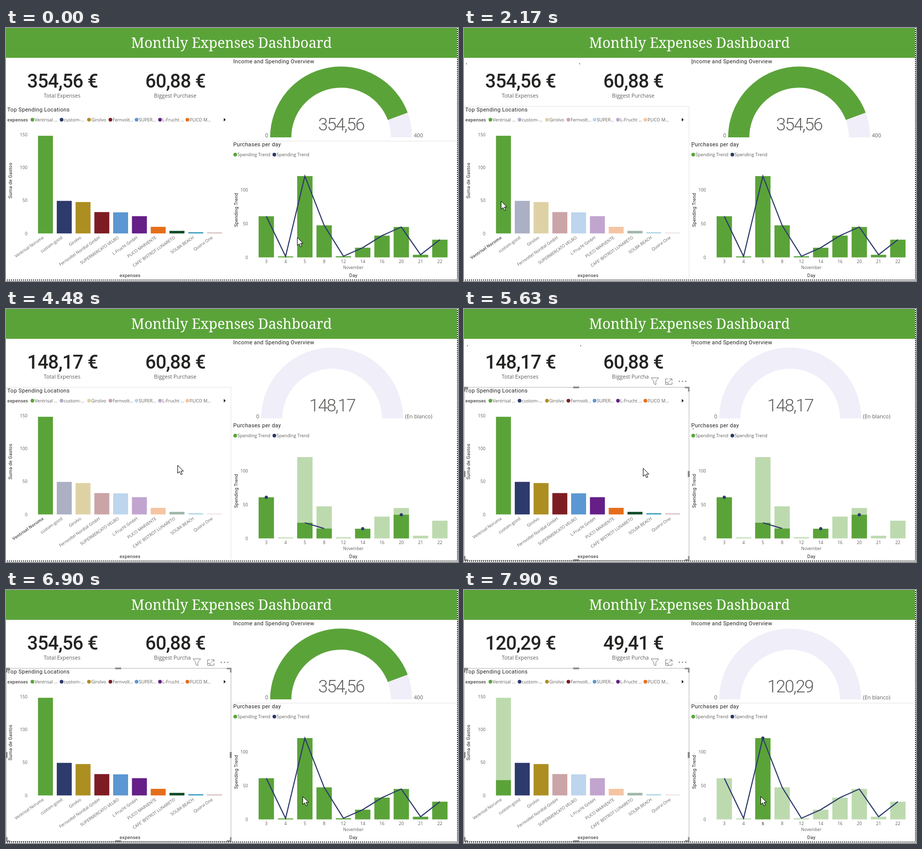
Animation, 907 px wide and 509 px high, one loop 8 s. Source, as an HTML page:

```html
<!DOCTYPE html>
<html lang="en">
<head>
<meta charset="utf-8">
<title>Monthly Expenses Dashboard</title>
<style>
  html, body { margin: 0; width: 100%; height: 100%; overflow: hidden; background: #fff; }
  svg { display: block; width: 907px; height: 509px; }
  text { font-family: "Open Sans", "Noto Sans", sans-serif; font-size: 8.8px; fill: #605e5c; white-space: pre; }
  .banner { font-family: "Noto Serif", serif; font-size: 28.4px; font-weight: 500; fill: #fff; }
  .head { font-family: Roboto, sans-serif; font-size: 11px; letter-spacing: .33px; fill: #252423; }
  .axis { font-family: Roboto, sans-serif; font-size: 9.5px; letter-spacing: .2px; fill: #252423; }
  .card { font-family: Roboto, sans-serif; font-size: 38px; font-weight: 500; letter-spacing: -.7px; fill: #252423; }
  .value { font-family: Roboto, sans-serif; font-size: 35px; font-weight: 300; letter-spacing: -2px; }
  .label { font-size: 10.7px; }
  .legend { font-size: 9px; }
  .tip { font-size: 12.4px; fill: #252423; }
  .bold { font-weight: 700; }
</style>
</head>
<body>
<svg id="stage" viewBox="0 0 907 509" xmlns="http://www.w3.org/2000/svg"></svg>
<script>
const LOOP = 8000;
const GREEN = '#5aa339', NAVY = '#2d3a6c', PALE = '#f0eef8';
const stage = document.getElementById('stage');

// name, amount, colour, amount left after picking day 5
const places = [
  ['Ventrisal Noruma', 148.17, GREEN, 23.2],
  ['custom-good', 49.41, NAVY, 49.41],
  ['Girolvo', 47.6, '#ad8e20', 47.6],
  ['Fernvoltel Nordtal GmbH', 32.4, '#7e1c23', 0],
  ['SUPERMERCATO VELBO', 32, '#5b97d2', 0],
  ['L-Frucht GmbH', 26.2, '#651f87', 0],
  ['PLICO MARVENTE', 10, '#e66e1a', 0],
  ["CAFE' BISTROT LUNARETO", 3.9, '#134b28', 0],
  ['SOLBA BEACH', 1.9, '#3598be', 0],
  ['Quorvi One', 1.5, '#d5b6b8', 0]
];

// dot x, shortened name
const legend = [
  [53, 'Ventrisal ...'], [111.5, 'custom-...'], [166.5, 'Girolvo'], [209.5, 'Fernvolt...'],
  [262, 'SUPER...'], [309, 'L-Frucht ...'], [364, 'PLICO M...']
];

// day, amount, amount left after picking the first place
const days = [
  [3, 60.88, 60.88], [4, 1.5, 0], [5, 120.29, 23.2], [8, 47.4, 14.6], [12, 1.7, 0],
  [14, 14.3, 14.3], [16, 32.2, 0], [20, 45, 35], [21, 3.9, 0], [22, 26.2, 0]
];

// time, x, y of the pointer
const moves = [
  [0, 584, 421], [150, 590, 420], [280, 595, 420], [420, 596, 420],
  [680, 520, 404], [810, 442, 384], [1080, 200, 356], [1200, 89, 344],
  [1490, 79, 347], [1620, 74, 348], [2590, 75, 348], [3380, 84, 348],
  [3540, 253, 311], [3680, 302, 312], [4240, 320, 312], [4360, 335, 313], [4480, 344, 314],
  [5630, 359, 320], [5910, 475, 388], [6210, 524, 393], [6360, 560, 399],
  [6490, 580, 404], [6630, 589, 410], [6760, 593, 413], [6900, 595, 415]
];

const rect = (x, y, w, h, fill, extra = '') =>
  `<rect x="${x}" y="${y}" width="${w}" height="${h}" fill="${fill}" ${extra}/>`;
const text = (s, x, y, cls = '', anchor = 'start', extra = '') =>
  `<text x="${x}" y="${y}" class="${cls}" text-anchor="${anchor}" ${extra}>${s}</text>`;
const dot = (x, y, r, fill, opacity = 1) =>
  `<circle cx="${x}" cy="${y}" r="${r}" fill="${fill}" opacity="${opacity}"/>`;
const path = (d, stroke, width = 1, fill = 'none') =>
  `<path d="${d}" fill="${fill}" stroke="${stroke}" stroke-width="${width}"/>`;
const turned = (s, x, y) => text(s, x, y, 'axis', 'middle', `transform="rotate(-90 ${x} ${y})"`);
const within = (t, a, b) => t >= a && t < b;

function bar(x, base, w, scale, full, part, fill) {
  const piece = (v, o) => rect(x, base - v * scale, w, v * scale, fill, `opacity="${o}"`);
  return part === full ? piece(full, 1) : piece(full, .4) + (part ? piece(part, 1) : '');
}

function cards(total, biggest) {
  return text(total + ' €', 113.5, 120, 'card', 'middle') +
    text('Total Expenses', 112.5, 140, 'label', 'middle') +
    text(biggest + ' €', 340, 120, 'card', 'middle') +
    text('Biggest Purchase', 339.5, 140, 'label', 'middle');
}

function ring(cx, from, to, fill) {
  const cy = 220, R = 142.5, r = 100;
  const at = (rad, f) => `${cx - rad * Math.cos(f * Math.PI)} ${cy - rad * Math.sin(f * Math.PI)}`;
  return `<path fill="${fill}" d="M${at(R, from)}A${R} ${R} 0 0 1 ${at(R, to)}L${at(r, to)}A${r} ${r} 0 0 0 ${at(r, from)}Z"/>`;
}

function gauge(total, blank) {
  const cx = blank ? 654.5 : 672.5;
  const share = 354.56 / 400;
  return text('Income and Spending Overview', 456, 71, 'head') +
    ring(cx, 0, 1, PALE) + (blank ? '' : ring(cx, 0, share, GREEN)) +
    text(total, cx, 206, 'value', 'middle') +
    text('0', cx - 146.5, 220, 'label', 'end') +
    text(blank ? '(En blanco)' : '400', cx + 146, 220, 'label');
}

function placeChart(pickFirst, pickDay) {
  let s = text('Top Spending Locations', 2.5, 168, 'head') + text('expenses', 2.5, 188, 'legend bold');
  legend.forEach(([x, name], i) => {
    s += dot(x, 184.5, 3.7, places[i][2], pickFirst && i ? .4 : 1) + text(name, x + 4.5, 188, 'legend');
  });
  s += '<path d="M437 181L440.8 184.5L437 188Z" fill="#111"/>';
  for (let v = 0; v <= 150; v += 50) s += text(v, 43, 416.5 - v * 1.326, '', 'end');
  places.forEach(([name, full, fill, left], i) => {
    const x = 64.2 + i * 37.7, part = pickFirst ? (i ? 0 : full) : pickDay ? left : full;
    s += bar(x, 413.3, 30, 1.326, full, part, fill);
    s += text(name, x + 12, 423, pickFirst && !i ? 'bold' : '', 'end',
      `transform="rotate(-35 ${x + 12} 423)" style="font-size:8.4px"`);
  });
  return s + turned('Suma de Gastos', 12, 307) + text('expenses', 249, 501, 'axis', 'middle');
}

function dayChart(pickFirst, pickDay) {
  let s = text('Purchases per day', 456, 238, 'head');
  [[460, GREEN], [538.5, NAVY]].forEach(([x, fill]) => {
    s += dot(x, 254.7, 3.7, fill) + text('Spending Trend', x + 4.5, 258, 'legend');
  });
  for (let v = 0; v <= 100; v += 50) s += text(v, 485.5, 465 - v * 1.36, '', 'end');
  const cx = i => 522.3 + i * 38.7, cy = v => 461.5 - v * 1.36;
  days.forEach(([day, full, left], i) => {
    const picked = pickDay && day === 5;
    const part = pickFirst ? left : pickDay && !picked ? 0 : full;
    s += bar(cx(i) - 15.4, 461.5, 30.8, 1.36, full, part, GREEN);
    s += text(day, cx(i), 473, picked ? 'bold' : '', 'middle');
  });
  const line = (from, to, col) => path('M' + days.slice(from, to)
    .map((d, i) => `${cx(i + from)} ${cy(d[col])}`).join('L'), NAVY, 2.2);
  if (pickFirst) {
    s += line(2, 4, 2);
    [0, 5, 7].forEach(i => s += dot(cx(i), cy(days[i][2]), 3.2, NAVY));
  } else {
    s += line(0, days.length, 1);
    if (pickDay) s += dot(cx(2), cy(days[2][1]), 3.2, NAVY);
  }
  return s + text('November', 697, 485, '', 'middle', 'style="font-size:8.3px"') +
    text('Day', 697, 501, 'axis', 'middle') + turned('Spending Trend', 465, 366);
}

function selection() {
  const grey = '#8a8a8a', icon = '#777';
  let s = rect(371, 128, 81, 28.5, '#fff') + path('M0.5 157.5H451.5V505.5H0.5Z', '#b5b5b5');
  s += path('M1.5 166V158H8M443 158H451V166M1.5 497V505H8M443 505H451V497', grey, 3);
  s += rect(219, 156, 12, 3.5, grey) + rect(219, 503.5, 12, 3.5, grey) +
    rect(0, 326, 3, 12, grey) + rect(449, 326, 4, 12, grey);
  s += path('M375.5 138.5H390.5L385 145.5V152.5L381 150V145.5Z', icon);
  s += path('M409 140.5H404.5V151.5H417.5V147M412 140.5H417.5V144.5M417 141L411 146.5M404.5 147.5H409.5V151.5', icon);
  [432, 438.5, 445].forEach(x => s += dot(x, 145.5, 1.2, icon));
  return s;
}

function loading(t) {
  const busy = within(t, 2170, 2450) || within(t, 5630, 5770) || within(t, 7460, 7600);
  if (!busy) return '';
  const early = t < 2300, k = early ? 0 : 2;
  const spots = [[5, 72], [232, 72], [458, 72], [458, 239]];
  if (!within(t, 5630, 5770)) spots.push([5, early ? 166 : 169]);
  return spots.map(([x, y]) => dot(x + k, y + k, 1.1, '#666')).join('');
}

function tooltip(opacity) {
  return `<g opacity="${opacity}">` + rect(623, 359, 212, 70, '#fff') +
    text('purchase_date Day', 750, 390, 'tip', 'end') + text('November 5', 762, 390, 'tip') +
    text('Spending Trend', 750, 409, 'tip', 'end') + text('120,29', 762, 409, 'tip') + '</g>';
}

function pointer(t) {
  const [, x, y] = moves.filter(m => m[0] <= t).pop();
  return `<path transform="translate(${x + .5} ${y + .5})" d="M0 0V16L3.8 12.6L6.6 18.8L9.2 17.7L6.5 11.6H11.6Z" fill="#fff" stroke="#000"/>`;
}

function picture(t) {
  const firstTotals = within(t, 2450, 5770), dayTotals = t >= 7600;
  const total = firstTotals ? '148,17' : dayTotals ? '120,29' : '354,56';
  const selected = t >= 5630;
  let s = rect(0, 0, 907, 509, '#fff') + rect(0, 0, 905, 60, GREEN) +
    text('Monthly Expenses Dashboard', 452.5, 40, 'banner', 'middle');
  if (t < 680 || t >= 5910) s += path('M453.5 227.5H903.5', '#e4e4e4');
  else if (!selected) s += path('M0 157.5H451.5V505', '#e4e4e4');
  s += cards(total, dayTotals ? '49,41' : '60,88');
  s += gauge(total, firstTotals || dayTotals);
  s += placeChart(within(t, 2170, 5630), dayTotals);
  s += dayChart(firstTotals, t >= 7460);
  if (selected) s += selection();
  s += loading(t);
  if (within(t, 7320, 7900)) s += tooltip(t < 7740 ? 1 : .5);
  s += '<path d="M906 0V507M0 507H907" fill="none" stroke="#222" stroke-width="2" stroke-dasharray="2 2" stroke-dashoffset="2"/>';
  return s + pointer(t);
}

let shown = '';
function frame() {
  const next = picture(performance.now() % LOOP);
  if (next !== shown) stage.innerHTML = shown = next;
  requestAnimationFrame(frame);
}
frame();
</script>
</body>
</html>
```
